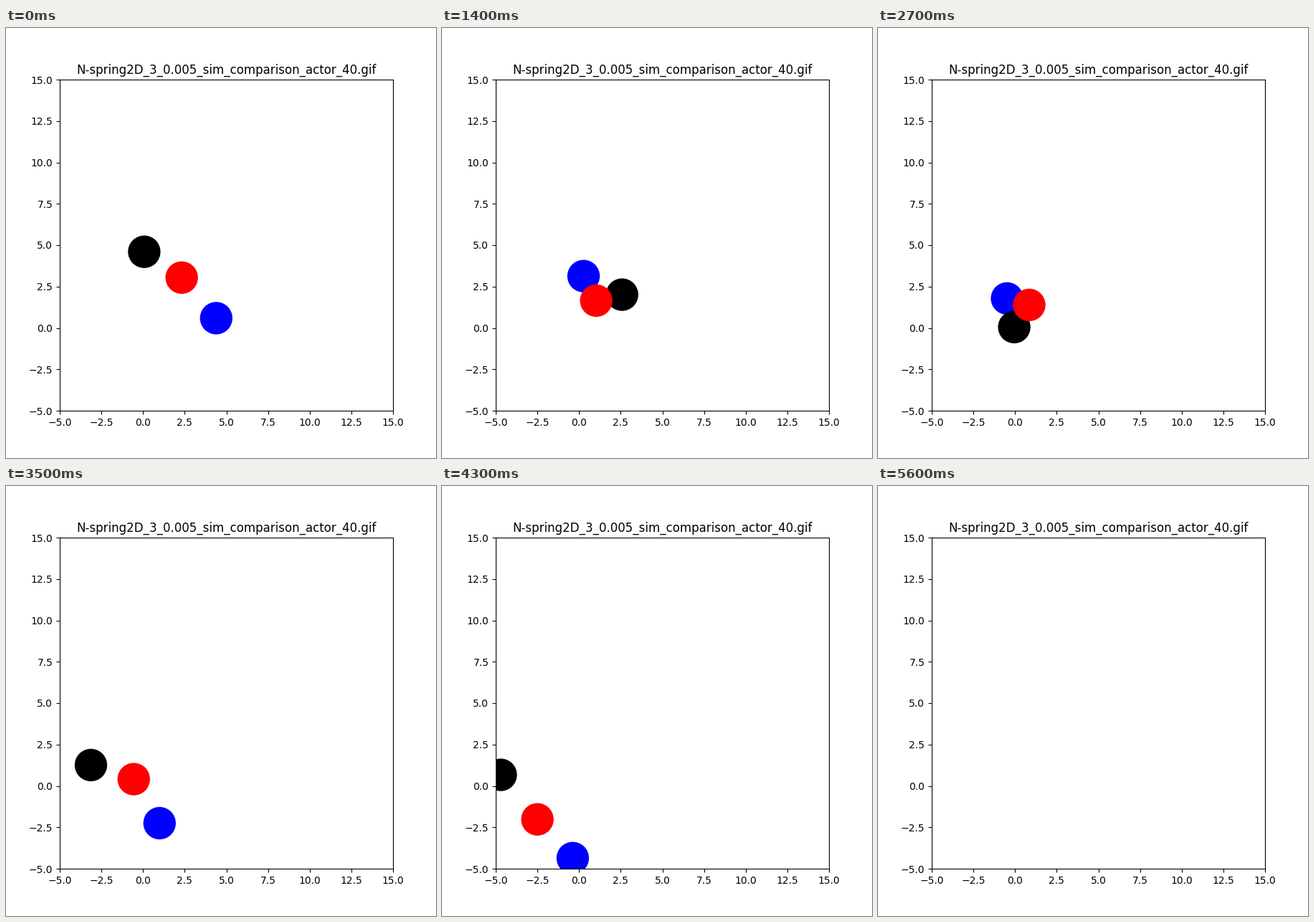
Animation of 600 by 600 pixels, one loop 7900 ms. Source, as a matplotlib script:

```python
import numpy as np
import matplotlib.pyplot as plt
from matplotlib.animation import FuncAnimation

STEP_MS = 100
FRAMES = 79

# Key poses: where each ball is at these seconds, back ball first.
TIMES = np.array([0, 0.6, 1.4, 2.1, 2.7, 3.5, 4.3, 5.6])
PATHS = {
    "blue": [(4.39, 0.59), (3.29, 1.00), (0.27, 3.13), (-1.14, 3.63),
             (-0.48, 1.78), (0.99, -2.25), (-0.38, -4.36), (-7.8, -6.8)],
    "black": [(0.07, 4.60), (1.23, 4.45), (2.58, 2.01), (1.90, 0.11),
              (-0.05, 0.05), (-3.13, 1.26), (-4.70, 0.67), (-5.4, -6.1)],
    "red": [(2.32, 3.04), (1.42, 2.44), (1.03, 1.65), (0.96, 1.43),
            (0.85, 1.39), (-0.56, 0.41), (-2.50, -2.02), (-6.9, -6.8)],
}


def natural_spline(t, p):
    """Return a smooth function of time through the poses p at times t."""
    h = np.diff(t)
    slope = np.diff(p, axis=0) / h[:, None]
    system = np.eye(len(t))
    rhs = np.zeros_like(p)
    for i in range(1, len(t) - 1):
        system[i, i - 1:i + 2] = h[i - 1], 2 * (h[i - 1] + h[i]), h[i]
        rhs[i] = 6 * (slope[i] - slope[i - 1])
    bend = np.linalg.solve(system, rhs)

    def pose(now):
        i = min(np.searchsorted(t, now, side="right"), len(h)) - 1
        a, b = t[i + 1] - now, now - t[i]
        return ((p[i] * a + p[i + 1] * b) / h[i]
                + bend[i] * (a**3 / h[i] - a * h[i]) / 6
                + bend[i + 1] * (b**3 / h[i] - b * h[i]) / 6)

    return pose


poses = np.hstack([np.array(path) for path in PATHS.values()])
pose_at = natural_spline(TIMES, poses)

fig, ax = plt.subplots(figsize=(6, 6), dpi=100)
ax.set_xlim(-5, 15)
ax.set_ylim(-5, 15)
ax.set_title("N-spring2D_3_0.005_sim_comparison_actor_40.gif")

start = poses[0].reshape(-1, 2)
balls = ax.scatter(start[:, 0], start[:, 1], s=1000, c=list(PATHS), linewidths=1)


def update(frame):
    now = min(frame * STEP_MS / 1000, TIMES[-1])
    balls.set_offsets(pose_at(now).reshape(-1, 2))
    return [balls]


anim = FuncAnimation(fig, update, frames=FRAMES, interval=STEP_MS,
                     repeat=True, repeat_delay=0)
plt.show()
```
